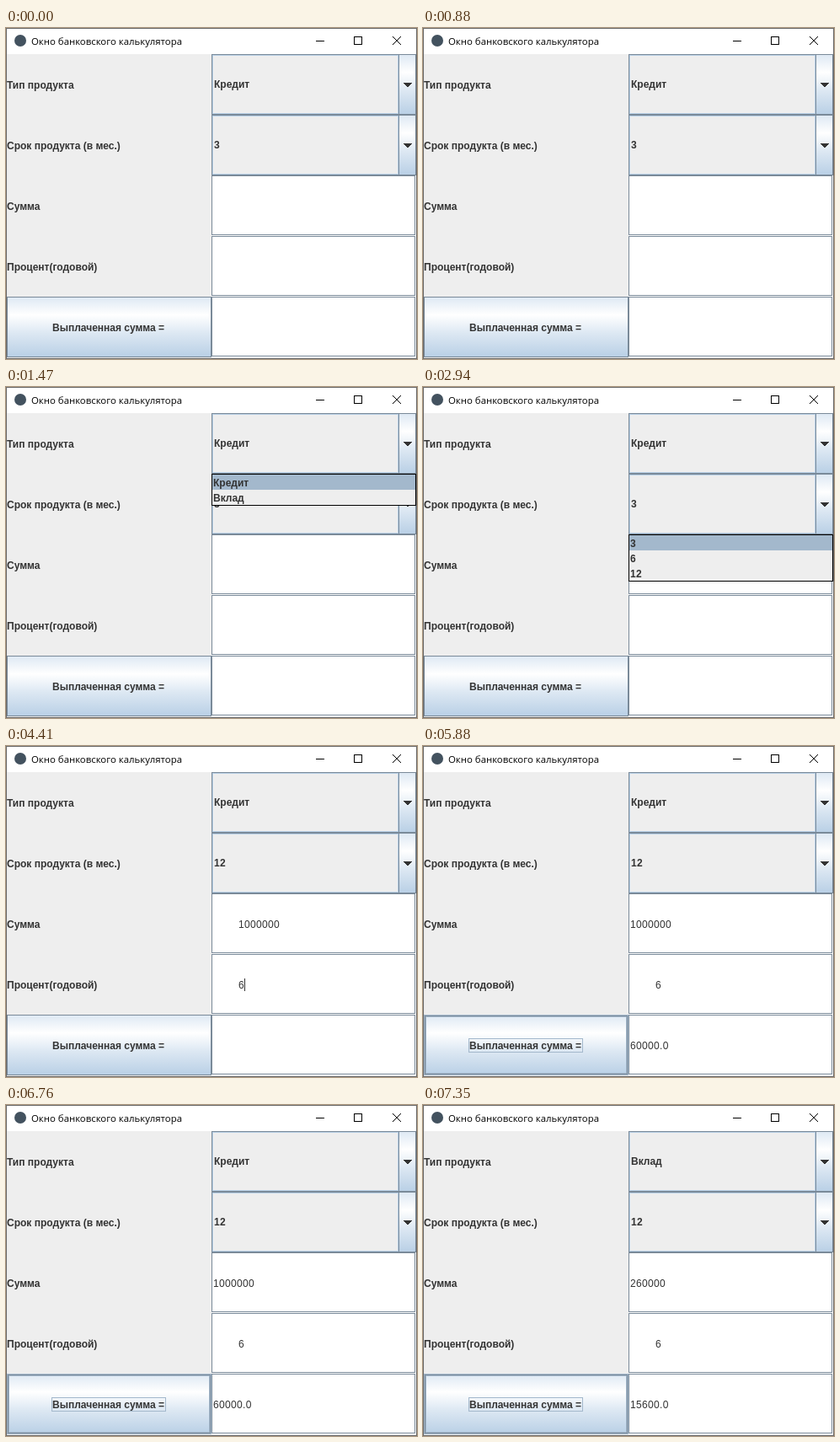
An HTML page with a canvas that plays this animation: 488 px wide and 393 px high, repeating every 8820 ms.

```html
<!DOCTYPE html>
<html lang="ru">
<head>
<meta charset="utf-8">
<title>Окно банковского калькулятора</title>
<style>
html, body { margin: 0; width: 488px; height: 393px; overflow: hidden; }
canvas { display: block; }
</style>
</head>
<body>
<canvas id="stage" width="488" height="393"></canvas>
<script>
const ctx = document.getElementById('stage').getContext('2d');
const STEP = 1470;
const LEFT = 1, MID = 244, COL = 243, TOP = 31, ROW = 72;
const BOLD = 'bold 12px "Liberation Sans", Arial, sans-serif';
const PLAIN = '12px "Liberation Sans", Arial, sans-serif';
const TITLE = '11.4px "Open Sans", sans-serif';
const INK = '#333333', PANEL = '#eeeeee', EDGE = '#7a8a99', SOFT = '#b8cfe5', FOCUS = '#a3b8cc';
const LABELS = ['Тип продукта', 'Срок продукта (в мес.)', 'Сумма', 'Процент(годовой)'];

const CREDIT = 'Кредит', DEPOSIT = 'Вклад';
const INDENT = 276, FLUSH = 246;
const base = { type: CREDIT, term: '3' };
const scenes = [
  base,
  { ...base, popup: { row: 1, items: [CREDIT, DEPOSIT] } },
  { ...base, popup: { row: 2, items: ['3', '6', '12'] } },
  { type: CREDIT, term: '12', sum: ['1000000', INDENT], rate: ['6', INDENT], caret: true },
  { type: CREDIT, term: '12', sum: ['1000000', FLUSH], rate: ['6', INDENT], total: ['60000.0', FLUSH], active: true },
  { type: DEPOSIT, term: '12', sum: ['260000', FLUSH], rate: ['6', INDENT], total: ['15600.0', FLUSH], active: true }
];

const rowY = i => TOP + i * ROW;

function fill(x, y, w, h, color) {
  ctx.fillStyle = color;
  ctx.fillRect(x, y, w, h);
}

function box(x, y, w, h, color) {
  ctx.strokeStyle = color;
  ctx.lineWidth = 1;
  ctx.strokeRect(x + 0.5, y + 0.5, w - 1, h - 1);
}

// Digits sit on a whole-pixel pitch of 7
function text(str, x, y, font = BOLD, color = INK) {
  ctx.font = font;
  ctx.letterSpacing = /^\d/.test(str) ? '0.33px' : '0px';
  ctx.fillStyle = color;
  ctx.fillText(str, x, y);
}

function gloss(x, y, w, h) {
  const g = ctx.createLinearGradient(0, y, 0, y + h);
  g.addColorStop(0, '#dde8f3');
  g.addColorStop(0.3, '#ffffff');
  g.addColorStop(0.6, '#dde8f3');
  g.addColorStop(1, SOFT);
  fill(x, y, w, h, g);
}

function titleBar() {
  fill(0, 0, 488, TOP, '#ffffff');
  ctx.fillStyle = '#43525f';
  ctx.beginPath();
  ctx.arc(17, 15, 7, 0, Math.PI * 2);
  ctx.fill();
  text('Окно банковского калькулятора', 30, 20, TITLE, '#000000');
  fill(368, 15, 10, 1, '#000000');
  box(413, 10, 10, 10, '#000000');
  ctx.strokeStyle = '#000000';
  ctx.beginPath();
  ctx.moveTo(459, 10);
  ctx.lineTo(469, 20);
  ctx.moveTo(469, 10);
  ctx.lineTo(459, 20);
  ctx.stroke();
}

function combo(row, value) {
  const y = rowY(row), split = 466;
  gloss(split, y, MID + COL - split, ROW);
  box(MID, y, COL, ROW, EDGE);
  box(MID + 1, y + 1, split - MID - 1, ROW - 2, SOFT);
  fill(split, y, 1, ROW, EDGE);
  for (let i = 0; i < 5; i++) fill(472 + i, y + 34 + i, 10 - 2 * i, 1, INK);
  text(value, 247, y + 40);
}

function field(row, value) {
  const y = rowY(row);
  fill(MID, y, COL, ROW, '#ffffff');
  box(MID, y, COL - 1, ROW - 1, EDGE);
  if (value) text(value[0], value[1], y + 41, PLAIN);
}

function button(active) {
  const y = rowY(4);
  gloss(LEFT, y, COL, ROW);
  if (active) {
    box(LEFT, y, COL, ROW, FOCUS);
    box(LEFT + 1, y + 1, COL - 2, ROW - 2, EDGE);
    box(LEFT + 2, y + 2, COL - 4, ROW - 4, FOCUS);
    box(54, 347, 136, 17, FOCUS);
  } else {
    box(LEFT, y, COL, ROW, EDGE);
  }
  text('Выплаченная сумма =', 55, y + 41);
}

function popup({ row, items }) {
  const y = rowY(row), line = 18, h = items.length * line + 2;
  fill(MID, y, COL, h, PANEL);
  fill(MID, y + 1, COL, line, FOCUS);
  box(MID, y, COL, h, '#000000');
  items.forEach((item, i) => text(item, 246, y + 15 + i * line));
}

function draw(s) {
  fill(0, 0, 488, 393, PANEL);
  titleBar();
  LABELS.forEach((label, i) => text(label, 1, rowY(i) + 41));
  combo(0, s.type);
  combo(1, s.term);
  field(2, s.sum);
  field(3, s.rate);
  field(4, s.total);
  button(s.active);
  if (s.caret) fill(283, 276, 1, 15, INK);
  if (s.popup) popup(s.popup);
  box(0, 0, 488, 393, '#6b6b6b');
}

function tick() {
  draw(scenes[Math.floor(performance.now() / STEP) % scenes.length]);
  requestAnimationFrame(tick);
}
tick();
</script>
</body>
</html>
```
